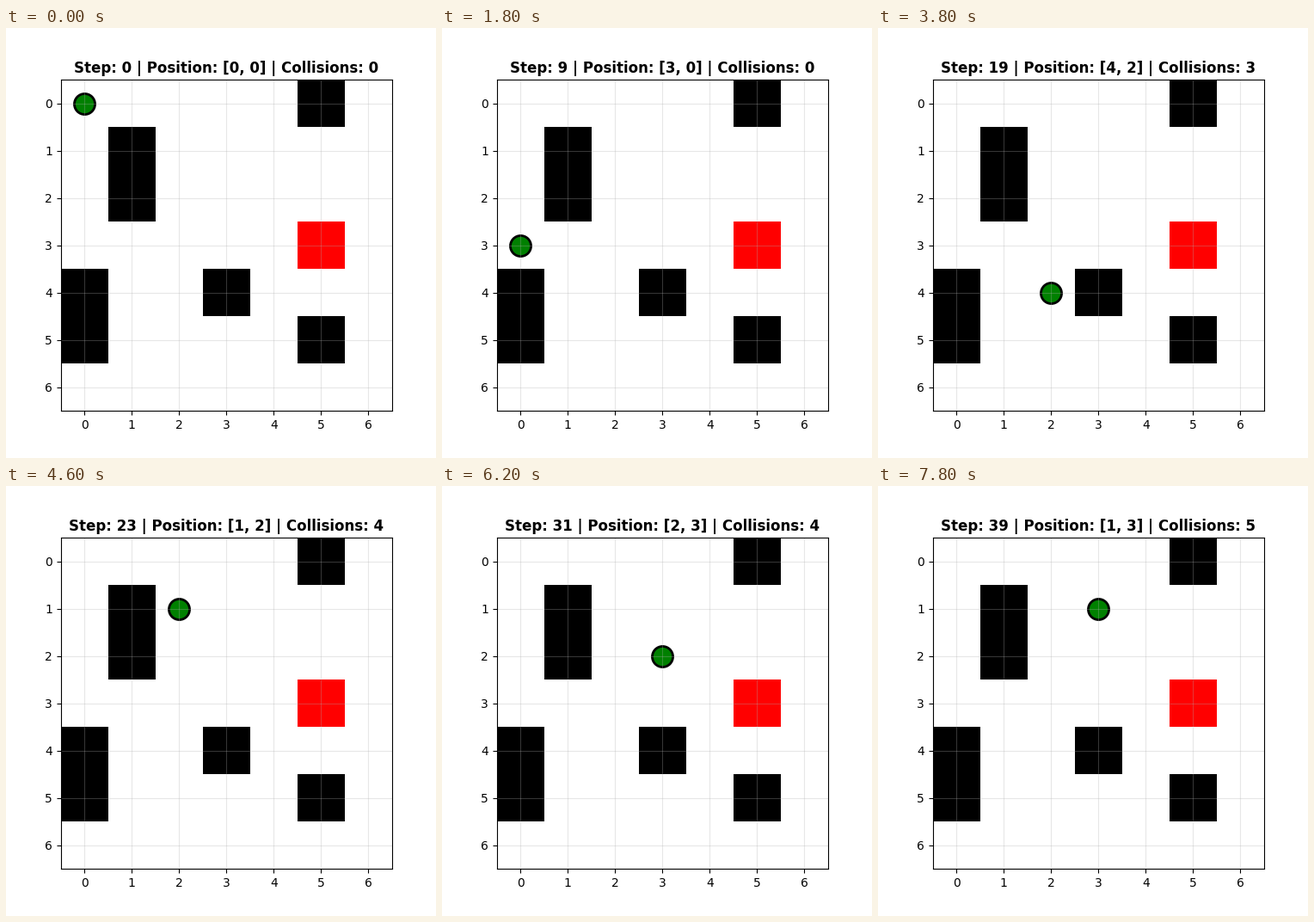
These frames come from a looping animation (500 px wide and 500 px high, 8 s). A matplotlib script:

```python
import numpy as np
import matplotlib.pyplot as plt
from matplotlib.animation import FuncAnimation

SIZE = 7
WALLS = [(0, 5), (1, 1), (2, 1), (4, 0), (4, 3), (5, 0), (5, 5)]
GOAL = (3, 5)
STEPS = {"U": (-1, 0), "D": (1, 0), "L": (0, -1), "R": (0, 1)}
MOVES = "DDDUDUUDD" "RDLRRU" "RDLDRUUU" "RDRUL" "RDLURD" "DLDUU"


def walk(moves):
    """Return (row, col, collisions) for the start and after every move."""
    row, col, hits = 0, 0, 0
    states = [(row, col, hits)]
    for move in moves:
        dr, dc = STEPS[move]
        if (row + dr, col + dc) in WALLS:
            hits += 1
        else:
            row, col = row + dr, col + dc
        states.append((row, col, hits))
    return states


states = walk(MOVES)

grid = np.ones((SIZE, SIZE, 3))
for cell in WALLS:
    grid[cell] = (0, 0, 0)
grid[GOAL] = (1, 0, 0)

fig, ax = plt.subplots(figsize=(5, 5), dpi=100)
ax.imshow(grid, interpolation="nearest")
ax.set_xticks(range(SIZE))
ax.set_yticks(range(SIZE))
ax.grid(True, alpha=0.3)
agent = ax.scatter([0], [0], s=300, c="green", edgecolors="black", linewidths=2)
title = ax.set_title("", fontsize=12, fontweight="bold")


def update(step):
    row, col, hits = states[step]
    agent.set_offsets([(col, row)])
    title.set_text(f"Step: {step} | Position: [{row}, {col}] | Collisions: {hits}")
    return agent, title


anim = FuncAnimation(fig, update, frames=len(states), init_func=lambda: update(0),
                     interval=200, repeat=True, repeat_delay=0)
plt.show()
```
